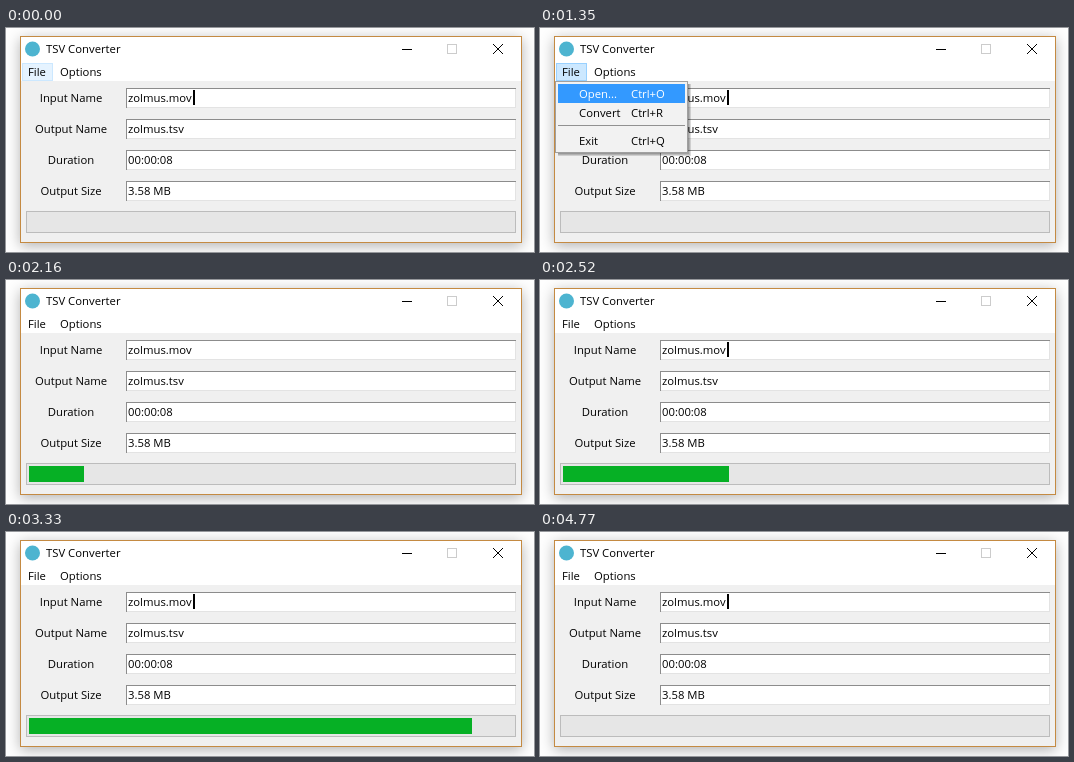
An HTML page with a canvas that plays this animation: 528 by 224 pixels, repeating every 5040 ms.

```html
<!DOCTYPE html>
<html lang="en">
<head>
<meta charset="utf-8">
<title>TSV Converter</title>
<style>
  html, body { margin: 0; width: 528px; height: 224px; overflow: hidden; background: #fefefe; }
  canvas { display: block; }
</style>
</head>
<body>
<canvas id="stage" width="528" height="224"></canvas>
<script>
const ctx = document.getElementById('stage').getContext('2d');
const LOOP = 5040, TICK = 90;
const FONT = '11.3px "Open Sans", "Noto Sans", sans-serif';
const BLUE = '#3399ff';

const FIELDS = [
  ['Input Name', 'zolmus.mov'],
  ['Output Name', 'zolmus.tsv'],
  ['Duration', '00:00:08'],
  ['Output Size', '3.58 MB']
];
const MENU = [
  { name: 'Open...', keys: 'Ctrl+O', y: 56 },
  { name: 'Convert', keys: 'Ctrl+R', y: 75 },
  { name: 'Exit', keys: 'Ctrl+Q', y: 103 }
];
const CARET_OFF = [360, 990, 1620, 2160, 2790, 3420, 3960, 4590];
// [time, steps completed]
const PROGRESS = [[2160, 1], [2340, 2], [2430, 2.5], [2520, 3], [2610, 4], [2790, 5],
  [2970, 6], [3060, 6.5], [3150, 7], [3330, 8], [3420, 9], [3690, 0]];

function rect(x, y, w, h, color) {
  ctx.fillStyle = color;
  ctx.fillRect(x, y, w, h);
}

function box(x, y, w, h, fill, border) {
  rect(x, y, w, h, border);
  rect(x + 1, y + 1, w - 2, h - 2, fill);
}

function text(str, x, y, color = '#000', align = 'left') {
  ctx.fillStyle = color;
  ctx.textAlign = align;
  ctx.fillText(str, x, y);
}

function faded(alpha, draw) {
  ctx.save();
  ctx.globalAlpha = alpha;
  draw();
  ctx.restore();
}

function line(color, ...points) {
  ctx.strokeStyle = color;
  ctx.lineWidth = 1;
  ctx.beginPath();
  for (let i = 0; i < points.length; i += 4) {
    ctx.moveTo(points[i], points[i + 1]);
    ctx.lineTo(points[i + 2], points[i + 3]);
  }
  ctx.stroke();
}

function drawWindow() {
  rect(0, 0, 528, 224, '#fefefe');
  ctx.save();
  ctx.shadowColor = 'rgba(0,0,0,.3)';
  ctx.shadowBlur = 13;
  ctx.shadowOffsetY = 3;
  rect(14, 8, 502, 207, '#c48a42');
  ctx.restore();
  rect(15, 9, 500, 44, '#fff');
  rect(15, 53, 500, 161, '#f0f0f0');

  ctx.fillStyle = '#4db4d0';
  ctx.beginPath();
  ctx.arc(26.5, 21, 7.5, 0, Math.PI * 2);
  ctx.fill();
  text('TSV Converter', 40, 25);

  rect(396, 21, 10, 1, '#000');
  box(441, 16, 10, 10, '#fff', '#cccccc');
  line('#000', 487, 16, 497, 26, 497, 16, 487, 26);
}

function drawMenuBar(t) {
  if (t < 630) box(16, 35, 31, 18, '#e5f3ff', '#cce8ff');
  else if (t < 1800) box(16, 35, 31, 18, '#cce8ff', '#99d1ff');
  text('File', 22, 48);
  text('Options', 54, 48);
}

function drawFields(t) {
  FIELDS.forEach(([label, value], i) => {
    const y = 60 + i * 31;
    text(label, 65, y + 14, '#000', 'center');
    box(120, y, 390, 20, '#fff', '#e3e3e3');
    rect(120, y, 390, 1, '#8c8c8c');
    rect(120, y, 1, 20, '#8c8c8c');
    text(value, 122, y + 14);
  });
  if (!CARET_OFF.some(off => t >= off && t < off + 180)) rect(187, 62, 2, 15, '#000');
}

function drawProgress(t) {
  box(20, 183, 490, 22, '#e6e6e6', '#bcbcbc');
  let steps = 0;
  for (const [time, count] of PROGRESS) if (t >= time) steps = count;
  const end = Math.min(507, 22 + steps * 55.5);
  if (steps) rect(23, 186, Math.round(end) - 23, 16, '#06b025');
}

function drawItem(item, selected) {
  if (selected) rect(18, item.y, 127, 19, BLUE);
  const color = selected ? '#fff' : '#000';
  text(item.name, 39, item.y + 14, color);
  text(item.keys, 91, item.y + 14, color);
}

function drawMenu(t) {
  if (t >= 630 && t < 1800) {
    faded(t < 720 ? 0.5 : 1, () => {
      for (let i = 3; i > 0; i--) rect(18, 56, 130 + i, 69 + i, 'rgba(0,0,0,.14)');
      box(15, 53, 133, 72, '#f2f2f2', '#a0a0a0');
      const active = t < 1350 ? -1 : t < 1530 ? 0 : 1;
      MENU.forEach((item, i) => drawItem(item, i === active));
      rect(18, 97, 127, 1, '#919191');
    });
  }
  // the chosen command lingers after the menu closes
  if (t >= 1800 && t < 2160) faded(0.86 - (t - 1800) / 90 * 0.215, () => drawItem(MENU[1], true));
}

function draw(now) {
  const t = Math.floor(now % LOOP / TICK) * TICK;
  ctx.font = FONT;
  drawWindow();
  drawMenuBar(t);
  drawFields(t);
  drawProgress(t);
  drawMenu(t);
}

const start = performance.now();
function loop() {
  draw(performance.now() - start);
  requestAnimationFrame(loop);
}
loop();
</script>
</body>
</html>
```
